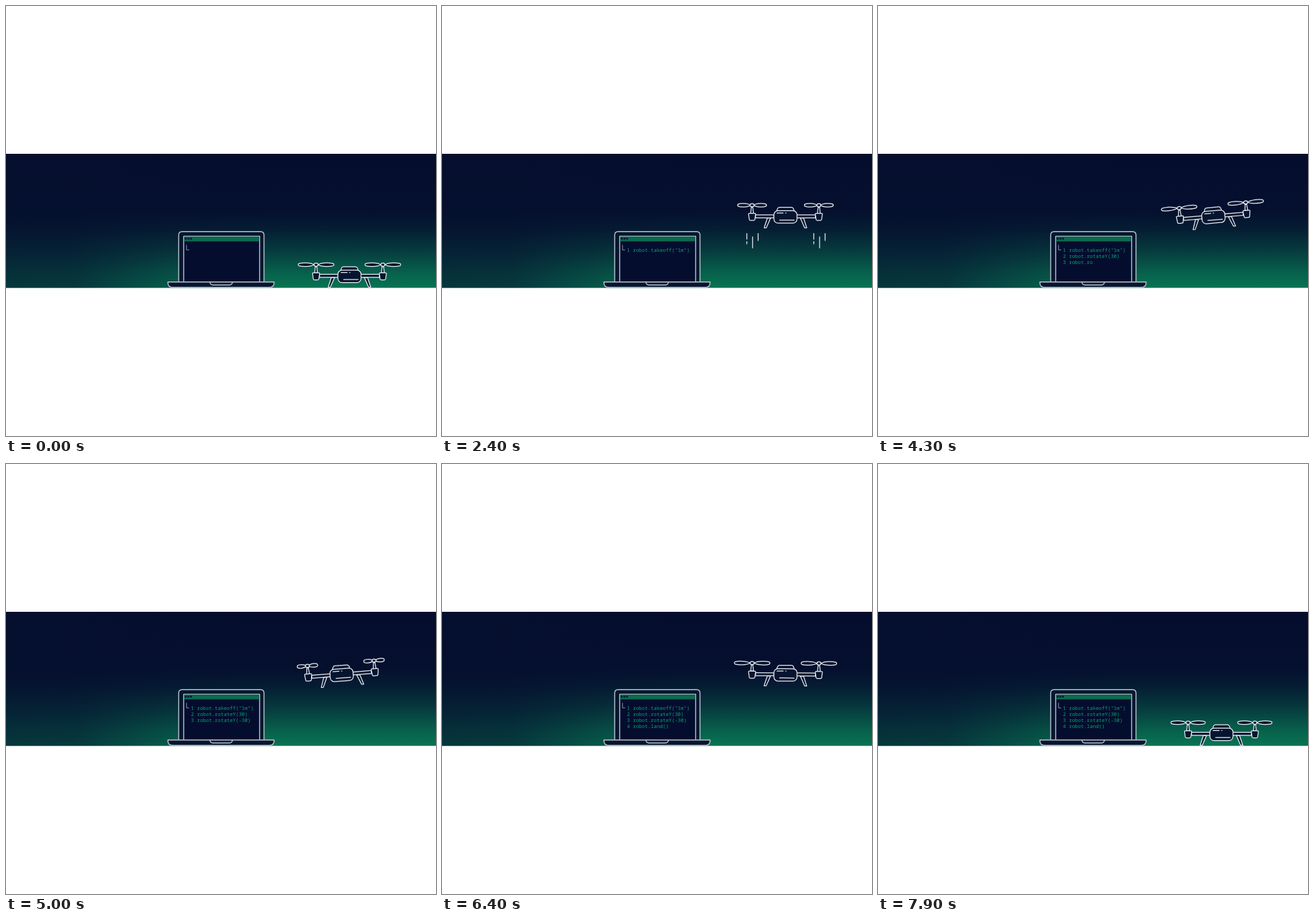
Write an HTML page that moves like this. It is 640x640 px and loops after 8 s.

```html
<!DOCTYPE html>
<html lang="en">
<head>
<meta charset="utf-8">
<title>Drone and laptop</title>
<style>
  html, body { margin: 0; width: 100%; height: 100%; overflow: hidden; background: #fff; }
  svg { position: absolute; left: 0; top: 0; width: 640px; height: 640px; }
  .line { fill: none; stroke: #e8edf3; stroke-width: 1.25; stroke-linecap: round; stroke-linejoin: round; }
  .solid { fill: #06152f; }
  .laptop { stroke: #bcc5d1; stroke-width: 1.4; }
  .blade { vector-effect: non-scaling-stroke; }
  text {
    font: 500 7.42px "Noto Sans Mono", "DejaVu Sans Mono", monospace;
    fill: #08a567; white-space: pre; text-rendering: geometricPrecision;
  }
</style>
</head>
<body>
<svg viewBox="0 0 640 640">
  <defs>
    <linearGradient id="ground" x1="0" y1="0" x2="0" y2="1">
      <stop offset="0" stop-color="#050d2d"/>
      <stop offset=".42" stop-color="#050f2e"/>
      <stop offset=".56" stop-color="#051d33"/>
      <stop offset=".72" stop-color="#063b3e"/>
      <stop offset=".88" stop-color="#07604b"/>
      <stop offset="1" stop-color="#087453"/>
    </linearGradient>
    <linearGradient id="shade">
      <stop offset="0" stop-color="#050f2e" stop-opacity=".6"/>
      <stop offset=".16" stop-color="#050f2e" stop-opacity=".58"/>
      <stop offset=".4" stop-color="#050f2e" stop-opacity=".22"/>
      <stop offset=".62" stop-color="#050f2e" stop-opacity="0"/>
    </linearGradient>
    <clipPath id="banner"><rect y="220" width="640" height="199.6"/></clipPath>

    <g id="blades" class="line solid">
      <path id="blade" class="blade" d="M3 0C8 -3.3 21 -3.2 25.5 -1.7Q27.6 0 25.5 1.7C21 3.2 8 3.3 3 0Z"/>
      <use href="#blade" transform="scale(-1 1)"/>
    </g>
    <g id="motor" class="line solid">
      <path d="M-1.1 3L-2.1 12H2.1L1.1 3Z"/>
      <path d="M-4 12H4Q5.4 12 5.2 13.5L4.2 21Q4 22.6 2.5 22.6H-2.5Q-4 22.6 -4.2 21L-5.2 13.5Q-5.4 12 -4 12Z"/>
    </g>
    <g id="side">
      <path class="line solid" d="M-27 2L-31.7 16.5H-28.6L-22.2 2Z"/>
      <path class="line solid" d="M-17 -2.8H-44.5V1.6H-17Z"/>
    </g>
    <g id="gust" class="line">
      <path d="M-8.3 .5V9M-8.3 12.5V16M.3 5.5V22M8.5 .5V11"/>
    </g>
  </defs>

  <g clip-path="url(#banner)">
    <rect y="220" width="640" height="200" fill="url(#ground)"/>
    <rect y="220" width="640" height="200" fill="url(#shade)"/>

    <g class="line laptop">
      <path d="M257 411V341Q257 335.7 262.3 335.7H378.7Q384 335.7 384 341V411" fill="#06172f"/>
      <rect x="264.5" y="342.6" width="113" height="68" fill="#050d2f"/>
      <rect x="265.2" y="343.3" width="111.6" height="7" fill="#0a6a4e" stroke="none"/>
      <path d="M241 410.8H399V412Q399 418.8 391.5 418.8H248.5Q241 418.8 241 412Z" fill="#07172f"/>
      <path d="M303.5 410.8Q303.8 415.2 308 415.2H332.5Q336.7 415.2 337 410.8"/>
    </g>
    <g fill="#06172f">
      <circle cx="267.4" cy="346.2" r="1.5"/>
      <circle cx="271.4" cy="346.2" r="1.5"/>
      <circle cx="275.4" cy="346.2" r="1.5"/>
    </g>
    <path d="M268.7 355.5V363H272.5" fill="none" stroke="#8c96a9"/>
    <g id="code"></g>

    <g id="wind">
      <use href="#gust" x="462"/>
      <use href="#gust" x="561.7"/>
    </g>

    <g id="drone">
      <use href="#side"/>
      <use href="#side" transform="scale(-1 1)"/>
      <path class="line solid" d="M-13 -8.5L-12 -11.8Q-11.2 -14 -9 -14H9Q11.2 -14 12 -11.8L13 -8.5Z"/>
      <rect class="line solid" x="-17.2" y="-9" width="34.4" height="18.4" rx="6"/>
      <path class="line" d="M-12.5 -5.5H-3.5M.2 -5.5H.8M-8.7 4.8H13"/>
      <g id="rotors"></g>
    </g>
  </g>
</svg>
<script>
  const LOOP = 8000, STEP = 100, CHARS_PER_STEP = 3.34;
  const LINES = [
    ['1 robot.takeoff("1m")', 600],
    ['2 robot.rotateY(30)', 2400],
    ['3 robot.rotateY(-30)', 4000],
    ['4 robot.land()', 5900]
  ];

  // Keys are [time, value] pairs.
  const HEIGHT = [[1600, 0], [2400, 88.5], [6530, 88.5], [7330, 0]];
  const SHIFT = [[3200, 0], [4200, -12], [4900, -12], [5800, 0]];
  const TILT = [[3200, 0], [4200, -4.9], [4900, -4.9], [5700, 4.6], [5900, 4.6], [6500, 0]];
  const TURNS = [[500, 0], [1400, 1.79], [2400, 3.825], [4300, 8], [5700, 10.567],
                 [7000, 13.26], [7900, 14.924], [8000, 15]];
  const LIFT_WIND = [[1700, 0], [1900, 1], [2700, 1], [3200, 0]];
  const LAND_WIND = [[6850, 0], [7000, 1], [7250, 1], [7500, 0]];
  const WIND_DRIFT = [[2400, 0], [3200, 8]];

  const linear = p => p;
  const sine = p => (1 - Math.cos(Math.PI * p)) / 2;

  function at(keys, t, ease = sine) {
    if (t <= keys[0][0]) return keys[0][1];
    for (let i = 1; i < keys.length; i++) {
      const [t0, a] = keys[i - 1], [t1, b] = keys[i];
      if (t <= t1) return a + (b - a) * ease((t - t0) / (t1 - t0));
    }
    return keys[keys.length - 1][1];
  }

  const byId = id => document.getElementById(id);

  function add(parent, tag, attrs) {
    const el = document.createElementNS('http://www.w3.org/2000/svg', tag);
    for (const name in attrs) el.setAttribute(name, attrs[name]);
    return parent.appendChild(el);
  }

  const code = byId('code'), drone = byId('drone'), wind = byId('wind');
  const rows = LINES.map((_, i) => add(code, 'text', { x: 275.3, y: 366.2 + 9 * i }));

  const props = [-49.7, 49.7].map(x => {
    const rotor = add(byId('rotors'), 'g', { transform: `translate(${x} -17.2)` });
    add(rotor, 'use', { href: '#motor' });
    const prop = add(rotor, 'use', { href: '#blades' });
    add(rotor, 'ellipse', { class: 'line solid', rx: 3, ry: 2.3 });
    return prop;
  });

  function draw(t) {
    LINES.forEach(([text, start], i) => {
      const count = Math.floor((t - start) / STEP * CHARS_PER_STEP);
      rows[i].textContent = text.slice(0, Math.max(0, count));
    });

    const height = at(HEIGHT, t);
    drone.setAttribute('transform',
      `translate(${511.2 + at(SHIFT, t)} ${402.2 - height}) rotate(${at(TILT, t)})`);

    const width = 0.65 + 0.35 * Math.cos(2 * Math.PI * at(TURNS, t, linear));
    props.forEach(prop => prop.setAttribute('transform', `scale(${width} 1)`));

    const landing = t > 5000;
    const top = landing ? 348.2 : 426.5 - at(WIND_DRIFT, t);
    wind.setAttribute('transform', `translate(0 ${top - height})`);
    wind.setAttribute('opacity', at(landing ? LAND_WIND : LIFT_WIND, t, linear));
  }

  const began = performance.now();
  function tick() {
    const t = (performance.now() - began) % LOOP;
    draw(Math.floor(t / STEP) * STEP);
    requestAnimationFrame(tick);
  }
  tick();
</script>
</body>
</html>
```
